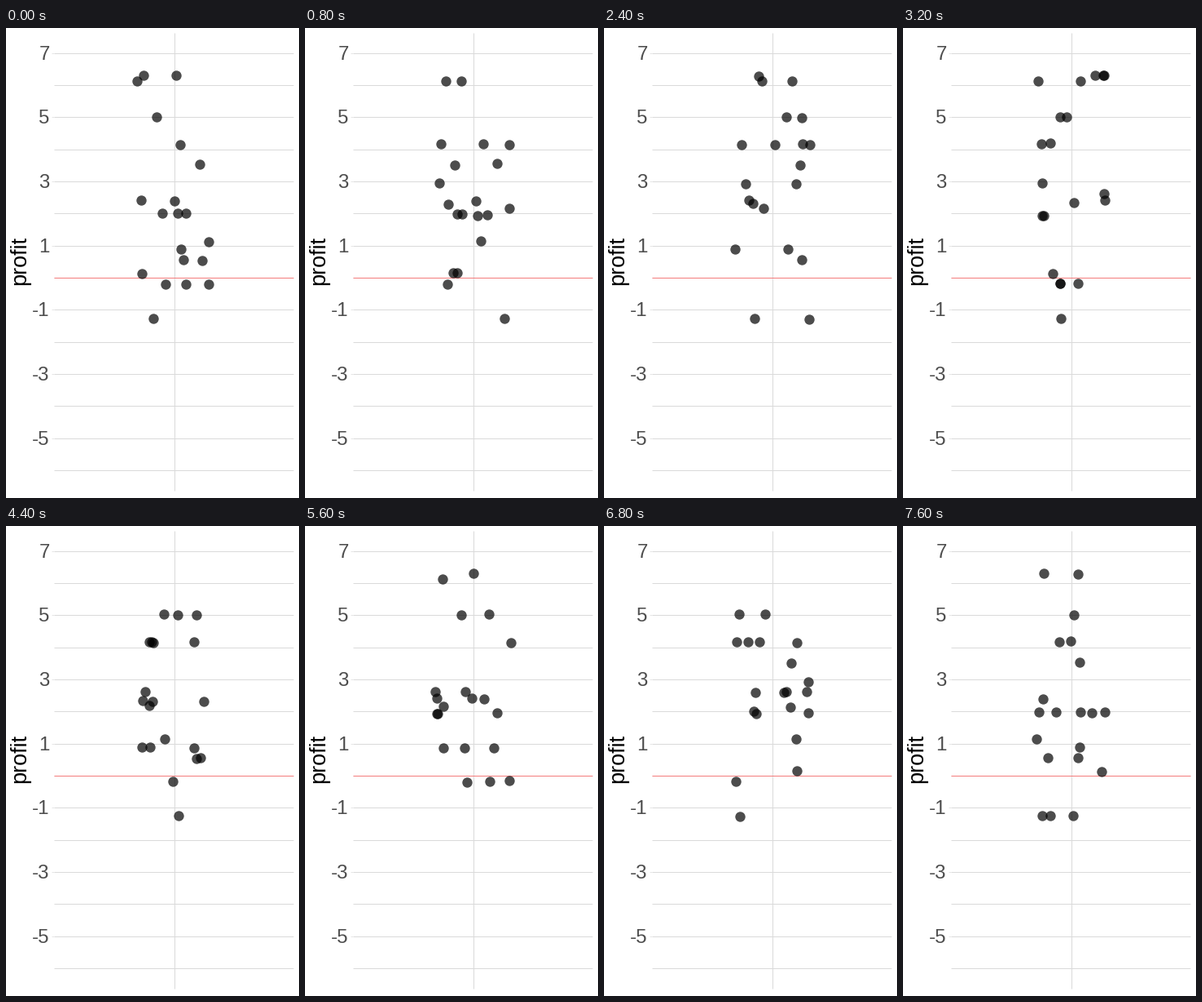
Write a matplotlib script that moves like this. It is 360 px wide and 576 px high and loops after 8000 ms.

```python
import numpy as np
import matplotlib.pyplot as plt
from matplotlib.animation import FuncAnimation

W, H, DPI = 360, 576, 100
FRAMES, STEP_MS = 20, 400
LEFT, RIGHT, MID = 59, 353, 206.5   # panel edges and centre
ZERO_Y, UNIT = 305.5, 39.33         # pixel row of profit 0, pixels per unit
JITTER_X, JITTER_Y = 47, 0.02

PROFITS = [6.29, 6.12, 5.0, 4.15, 4.15, 3.52, 2.92, 2.61, 2.39, 2.3,
           2.15, 1.98, 1.93, 1.12, 0.87, 0.54, 0.13, -0.19, -0.23, -1.28]

GRID, TICK, RED = "#dadada", "#e6e6e6", "#f47c7c"


def to_y(profit):
    return ZERO_Y - UNIT * profit


def resample(i):
    """Jittered bootstrap sample of the profits for step i."""
    rng = np.random.default_rng(100 + i)
    n = len(PROFITS)
    profit = rng.choice(PROFITS, n) + rng.uniform(-JITTER_Y, JITTER_Y, n)
    x = MID + rng.uniform(-JITTER_X, JITTER_X, n)
    return np.column_stack([x, to_y(profit)])


fig = plt.figure(figsize=(W / DPI, H / DPI), dpi=DPI, facecolor="white")
ax = fig.add_axes([0, 0, 1, 1])
ax.set(xlim=(0, W), ylim=(H, 0))
ax.axis("off")


def line(xs, ys, color, z=1):
    ax.plot(xs, ys, color=color, lw=72 / DPI, solid_capstyle="butt", zorder=z)


def label(x, y, text, size, color, **kw):
    ax.text(x, y, text, fontsize=size * 72 / DPI, color=color,
            family="Liberation Sans", va="baseline", **kw)


for value in range(-6, 8):
    y = np.floor(to_y(value)) + 0.5
    line([LEFT, RIGHT], [y, y], GRID)
    if value % 2:
        line([LEFT - 3, LEFT], [y, y], TICK)
        label(53.7, y + 8.3, str(value), 24, "#4d4d4d", ha="right")
line([MID, MID], [6, 567], GRID)
line([LEFT, RIGHT], [ZERO_Y, ZERO_Y], RED, z=2)
label(24, 284.5, "profit", 27, "black", ha="center",
      rotation=90, rotation_mode="anchor")

dots = ax.scatter([], [], s=(12.4 * 72 / DPI) ** 2, color="black",
                  alpha=0.7, linewidths=0, zorder=3)


def update(i):
    dots.set_offsets(resample(i))
    return (dots,)


anim = FuncAnimation(fig, update, frames=FRAMES, interval=STEP_MS,
                     repeat=True, repeat_delay=0, blit=False)
plt.show()
```
